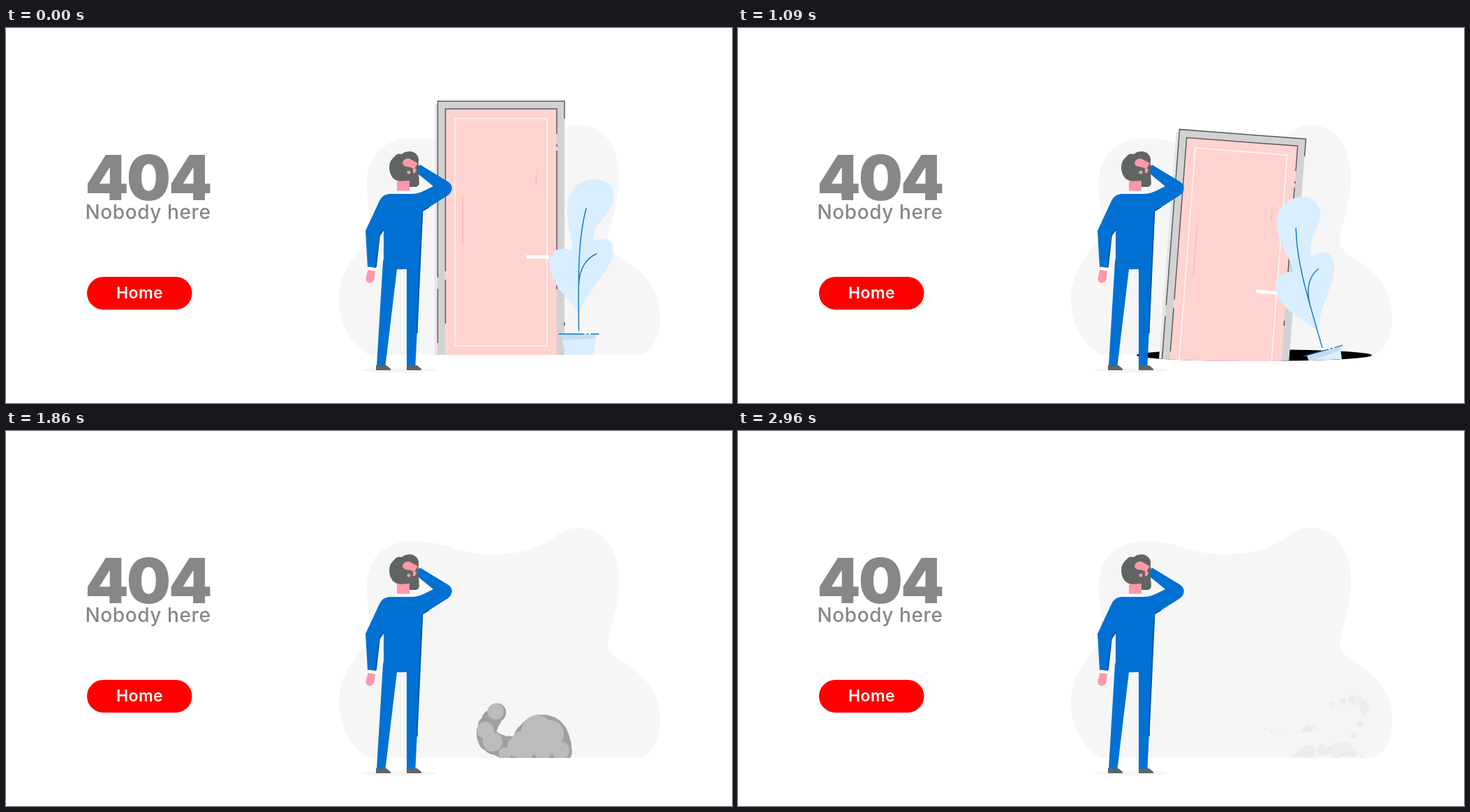
An HTML page that plays this animation: 1040 px wide and 538 px high, repeating every 3.02 s.

```html
<!DOCTYPE html>
<html lang="en">
<head>
<meta charset="utf-8">
<title>404</title>
<style>
  html, body { margin: 0; width: 100%; height: 100%; overflow: hidden; background: #fff; }
  svg { display: block; width: 100vw; height: 100vh; }
  text { font-family: Inter, "Open Sans", sans-serif; text-anchor: middle; }
  .line { fill: none; stroke: #5c5c5c; stroke-width: 1.5; }
  .stem { fill: none; stroke: #0a75c9; stroke-width: 1.4; stroke-linecap: round; }
  .suit { fill: #0071d3; }
  .fold { fill: none; stroke: #004f9e; stroke-width: 1.6; }
  .skin { fill: #ff97a9; }
  .hair { fill: #606562; }
</style>
</head>
<body>
<svg viewBox="0 0 1040 538">
  <defs>
    <clipPath id="aboveFloor"><path d="M400 0H1040V469.5H905A165.5 8.5 0 0 1 574 469.5H400Z"/></clipPath>
    <clipPath id="smokeArea"><path d="M600 300H1000V469H600Z"/></clipPath>
  </defs>

  <g fill="#878787">
    <text x="203" y="247" font-size="89" font-weight="900" letter-spacing="-3">404</text>
    <text x="203.5" y="274" font-size="28" font-weight="500" letter-spacing=".6">Nobody here</text>
  </g>
  <rect x="116" y="357" width="150.500" height="47" rx="23.500" fill="#f00"/>
  <text x="191.5" y="388" font-size="23" font-weight="600" letter-spacing=".4" fill="#fff">Home</text>

  <path fill="#f6f6f6" d="M521 469C494 457 477 422 477 390C477 352 497 331 511 312C528 288 517 258 517 222C517 185 540 158 582 158C630 158 648 177 695 177C742 177 765 167 785 153C796 145 806 139 820 139C858 139 878 172 878 215C878 258 862 285 862 308C862 332 937 340 937 415C937 442 925 469 905 469Z"/>

  <ellipse id="hole" cx="739.5" cy="469.500" rx="0" ry="8.500"/>

  <g clip-path="url(#aboveFloor)">
    <g id="door">
      <path fill="#e6e6e6" d="M614 109H618V469H614Z"/>
      <path fill="#d2d2d2" d="M618 105H800V469H618Z"/>
      <path fill="#ffd3d0" d="M629 116H789V469H629Z"/>
      <path class="line" d="M618.500 358V105H800V130M618.500 374V452M629.500 349V116H789V152M629.500 361V424M789 167V170M789 176V318M789 367V375M800 422V427"/>
      <path fill="none" stroke="#fff6ed" stroke-width="1.700" d="M643 130H775V456H643Z"/>
      <path fill="none" stroke="#ffb3b4" stroke-width="1.400" d="M654 240V312M759.500 205V208M759.500 210V224"/>
      <path fill="#fff" d="M745 326H778V331H745Z"/>
    </g>
    <g id="plant">
      <path fill="#d9eeff" d="M821 411C812 392 779 370 779 340C779 318 794 314 810 318C813 300 804 288 804 263C804 236 818 217 844 217C861 217 871 229 871 243C871 265 840 279 841 304C849 304 869 297 870 318C870 347 834 370 821 411Z"/>
      <path class="stem" d="M831 259C819 306 820 350 820.500 434M846 324C831 330 821 346 820.500 369"/>
      <path fill="#d9eeff" d="M796 439H846L841 469H801Z"/>
      <path fill="#c4dcef" d="M796 440H845L844 445L797 448Z"/>
      <path class="stem" d="M792 439H828M832 439H834M838 439H849"/>
    </g>
  </g>

  <g id="smoke" clip-path="url(#smokeArea)"></g>

  <ellipse cx="563" cy="491" rx="54" ry="3.500" fill="#f4f4f4"/>
  <g>
    <path class="hair" d="M530 484H545L551 489V491H530ZM574 484H589L595 489V491H574Z"/>
    <path class="suit" d="M540 335L531 484.500H543.500L560 346H574V484.500H586.500L597 262L560 250Z"/>
    <path class="suit" d="M549 238H580C588 238 594 236 600 233L612 227L585 205L593 196L634 221C641 226 640 235 633 240L597 263L592 340Q568 352 541 341V289L534 299L530 344L518 343L515 291L535 248Q539 239 549 238Z"/>
    <path class="fold" d="M541 289L535 298L530 343M596.500 263L589 430V438M597 262L606 257"/>
    <path fill="#fff" d="M519 342.500L530 344.500L529 348.500L518.500 347ZM558 234.500L579 233.500L582 237.500H556ZM585 204.500L592.500 195.500L589 193.500L582 202Z"/>
    <path class="skin" d="M518.500 347L529 348.500L527.500 361Q524 367 519 365.500Q514 362 516 357Z"/>
    <path class="hair" d="M557 184Q560 179 567 181Q571 177 579 177Q587 178 590 184Q592 188 591 193V208L592 222Q592 227 587 228H578V221Q561 222 554 215Q549 208 549 200Q549 190 557 184Z"/>
    <path class="skin" d="M560 220L578 219V233.500H560ZM583 199L588 203L586 208H583Z"/>
    <circle class="skin" cx="577" cy="207" r="2.500"/>
    <path class="skin" d="M568 193Q570 187 577 187L590 194L585 202Q578 199 574 199Q568 198 568 193Z"/>
  </g>
</svg>
<script>
const LOOP = 3020;
const HOLE_WIDTH = 165.5;
const BURST = 1790, BILLOW = 1860, SPREAD = 2350, LAST_WISPS = 2870, GONE = 2960;
const LOBES = 10;
const byId = id => document.getElementById(id);
const clamp = v => Math.min(1, Math.max(0, v));
const mix = (a, b, p) => a + (b - a) * p;
const progress = (t, from, to) => clamp((t - from) / (to - from));
const backIn = p => p * p * (2.7 * p - 1.7);
const setAttrs = (el, attrs) => Object.entries(attrs).forEach(([k, v]) => el.setAttribute(k, v));

function seeded(seed) {
  const v = Math.sin(seed * 127.1) * 43758.5453;
  return v - Math.floor(v);
}

// Each plume is a row of lobes on a quadratic curve: x and y of three points.
// size: radius at root, at tip, and extra bulge between them.
const plumes = [
  { early: [742, 448, 778, 412, 796, 460], earlySize: [19, 16, 0.45],
    late: [780, 455, 844, 365, 760, 392], lateSize: [24, 8, 0.35] },
  { early: [735, 455, 662, 452, 703, 404], earlySize: [17, 13, 0],
    late: [735, 424, 700, 440, 665, 428], lateSize: [20, 10, -0.75] },
  { early: [716, 464, 760, 454, 796, 464], earlySize: [11, 12, 0.5],
    late: [708, 466, 750, 448, 803, 467], lateSize: [11, 12, 1] }
];

const smoke = byId('smoke');
function addLayer(fill, every, scale, shift) {
  return plumes.flatMap((plume, n) => Array.from({ length: LOBES }, (_, i) => i)
    .filter(i => i % every === 0)
    .map(i => {
      const el = document.createElementNS(smoke.namespaceURI, 'ellipse');
      el.setAttribute('fill', fill);
      smoke.append(el);
      return { el, plume, u: i / (LOBES - 1), chance: seeded(n * LOBES + i + 1), scale, shift };
    }));
}
const lobes = [...addLayer('#a0a0a0', 1, 1, 0), ...addLayer('#bcbcbc', 3, 0.85, -0.12)];

function along(curve, u, axis) {
  const [a, b, c] = [curve[axis], curve[axis + 2], curve[axis + 4]];
  return mix(mix(a, b, u), mix(b, c, u), u);
}
const lobeSize = ([root, tip, bulge], u) => mix(root, tip, u) * (1 + bulge * Math.sin(Math.PI * u));

function drawSmoke(t) {
  smoke.style.display = t >= BURST ? '' : 'none';
  if (t < BURST) return;
  const [from, step] = t < LAST_WISPS ? [BURST, 70] : [LAST_WISPS, 30];
  const now = from + Math.floor((t - from) / step) * step;
  const grow = mix(0.6, 1, progress(now, BURST, BILLOW));
  const spread = progress(now, BILLOW, SPREAD);
  const thin = progress(now, SPREAD, GONE);
  for (const { el, plume, u, chance, scale, shift } of lobes) {
    const at = axis => mix(along(plume.early, u, axis), along(plume.late, u, axis), spread);
    const size = mix(lobeSize(plume.earlySize, u), lobeSize(plume.lateSize, u), spread);
    const r = size * mix(0.93, 1.07, chance) * grow * (1 - thin * mix(0.4, 0.95, chance));
    const x = mix(740, at(0), grow) + 90 * thin ** 4;
    const y = mix(469, at(1), grow);
    setAttrs(el, { cx: x + r * shift, cy: y + r * shift, rx: r * scale, ry: r * scale });
  }
  smoke.setAttribute('opacity', mix(1, 0.1, progress(now, 2480, 2920)));
}

function fall(s, lift, gravity, offset, speed, pull) {
  const u = s - 0.21;
  return u < 0 ? gravity * s * s - lift * s : offset + speed * u + pull * u ** 3;
}

function drawFall(t) {
  const now = Math.floor((t - 10) / 30) * 30 + 10;
  const s = Math.max(0, (now - 700) / 1000);
  const open = 1 - backIn(1 - progress(now, 692, 1142));
  const close = 1 - backIn(progress(now, 1240, 1690));
  byId('hole').setAttribute('rx', now < 700 ? 0 : Math.max(0, HOLE_WIDTH * open * close));

  const doorY = fall(s, 197, 1006, 3, 110, 4105);
  const doorTurn = 4.7 * (1 - Math.exp(-s / 0.15));
  const plantX = -266 * Math.max(0, s - 0.21) ** 2;
  const plantY = fall(s, 142, 654, -1, 70, 2565);
  const plantTurn = -80.2 * s ** 1.72;
  const visibility = s < 0.8 ? 'visible' : 'hidden';
  setAttrs(byId('door'), { visibility, transform: `translate(0 ${doorY}) rotate(${doorTurn} 709 287)` });
  setAttrs(byId('plant'), { visibility, transform: `translate(${plantX} ${plantY}) rotate(${plantTurn} 825 343)` });
}

function draw() {
  const t = performance.now() % LOOP;
  drawFall(t);
  drawSmoke(t);
  requestAnimationFrame(draw);
}
draw();
</script>
</body>
</html>
```
